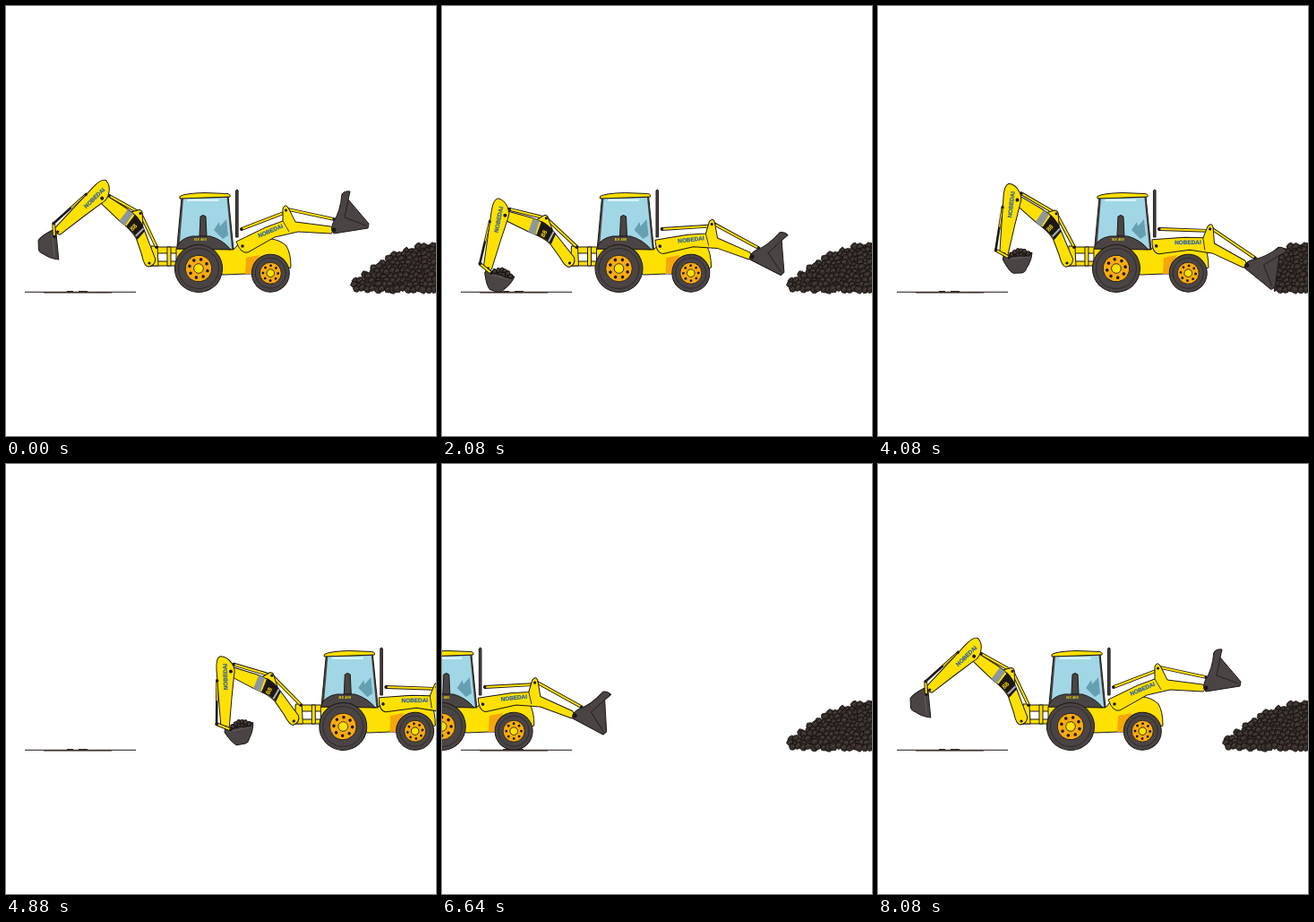
Recreate the animation shown at these times as an HTML page. Size 480 by 480 pixels, loop 8.16 s.

```html
<!DOCTYPE html>
<html lang="en">
<head>
<meta charset="utf-8">
<title>Backhoe loader</title>
<style>
html, body { margin: 0; width: 100%; height: 100%; overflow: hidden; background: #fff; }
svg { display: block; width: 100%; height: 100%; }
.y { fill: #fee102; }
.d { fill: #4a4544; }
.y, .d { stroke: #1d1714; stroke-width: 1; stroke-linejoin: round; }
.k { fill: #1d1714; }
.rim { fill: #f9ab10; stroke: #1d1714; stroke-width: .8; }
.brand { font: bold 6.4px Arial, "Liberation Sans", sans-serif; fill: #2d62a0; stroke: #2d62a0; stroke-width: .25; text-anchor: middle; }
.tag { font: bold 4px Arial, "Liberation Sans", sans-serif; fill: #fee102; text-anchor: middle; }
.rock { fill: #352d2a; stroke: #120d0b; stroke-width: .8; }
.glint { fill: none; stroke: #6a5e58; stroke-width: .7; }
.edge { stroke: #1d1714; stroke-width: 3.8; stroke-linecap: round; }
.rod { stroke: #fee102; stroke-width: 2; stroke-linecap: round; }
</style>
</head>
<body>
<svg viewBox="0 0 480 480">
  <defs>
    <clipPath id="pileClip"><rect id="pileLeft" y="240" height="90"/><rect id="pileRight" y="240" width="600" height="90"/></clipPath>
    <clipPath id="groundClip"><rect width="480" height="320.7"/></clipPath>
  </defs>

  <path d="M21 319.3H145" stroke="#1d1714"/>
  <path d="M42 320H118" stroke="#2c1712"/>
  <path d="M68 318.600H75M81 318.600H91" stroke="#1d1714"/>

  <g id="pile" clip-path="url(#pileClip)"></g>

  <g clip-path="url(#groundClip)"><g id="machine">
    <path class="y" d="M163 269H192V276H163ZM160 285H192V290H160Z"/>
    <path class="y" d="M162 268h7l1 22h-9zM180 269h4v21h-4z"/>

    <g id="boomRam"></g>
    <g id="stickRam"></g>
    <g id="digger">
      <path class="d" d="M-1 2L31 0Q30 9 24 17Q22 22 18 22H9Q4 19 -2 6Z"/>
      <path d="M3 6L28 4.5" stroke="#6b6462" stroke-width=".8"/>
      <g id="load"></g>
    </g>
    <g id="boom">
      <path class="y" d="M-18 -58L-8 -60Q-4 -59 -5 -54L-5 -42Z"/>
      <path class="y" d="M-54 -75Q-51 -83 -44 -78L-23 -63Q-8 -52 -4 -38L7 -4Q6 4 -2 4Q-6 3 -8 -10L-13 -28Q-18 -38 -30 -48L-50 -69Z"/>
      <path fill="#8d979b" d="M-31 -49L-21 -61L-15 -56L-25 -43Z"/>
      <path class="k" d="M-24 -42L-13 -55Q-7 -49 -3 -36L-12 -27Q-16 -36 -24 -42Z"/>
      <path d="M-13.500 -31L-4.500 -39" stroke="#a9b1b4" stroke-width="2"/>
      <text class="tag" style="font-size:7px" transform="translate(-14 -39) rotate(-42)">88</text>
      <circle class="k" cx="-7" cy="-56" r="1.6"/><circle class="k" r="1.6"/>
    </g>
    <g id="stick">
      <path d="M-17 6L-28 53" class="edge" style="stroke-width:2.6"/>
      <path d="M-17 6L-22 28" class="rod" style="stroke-width:1.2"/>
      <path class="y" d="M-15 -6Q-13 -18 -8 -19Q-1 -18 3 -9Q6 -2 3 4L-5 28L-15 60Q-20 63 -24 57Z"/>
      <text class="brand" transform="translate(-5 5) rotate(-79)">NOBEDAI</text>
      <circle class="k" r="2"/><circle class="k" cx="-17" cy="7" r="1.6"/><circle class="k" cx="-19" cy="59" r="1.6"/>
    </g>
    <g id="diggerLink"></g>

    <path class="d" d="M256.500 206q1.300 -2 2.600 0V258h-2.600z"/>
    <path class="y" d="M190 271L255 271L262 262Q300 254 313 268Q318 276 318 292L300 299H268L243 300L190 290Z"/>
    <path fill="#f6a60a" d="M268 281L283 278L274 299H267Z"/>
    <path class="d" d="M196 214L248 212L254 272L191 268Z"/>
    <path fill="#a1d7e5" d="M198 215L246.500 214L252 271H245Q234 257 207 258L194 263Z"/>
    <path fill="#65a0b2" d="M232 250L238 241L239 246L246 238L248 256L242 260Z"/>
    <path fill="#d8f3f9" d="M203 215.500H238L237 218H202Z"/>
    <path class="y" d="M194 212.500Q200 209 222 208.500L247 209.500Q251 210 250 213L194 215Z"/>
    <path class="d" d="M217 235q3 -3 6 0l1 22h-8z"/>
    <path class="d" d="M190 271Q194 259 208 257H228Q242 261 251 272Z"/>
    <text class="tag" x="217" y="261.500">BX 400</text>
    <g id="rear"></g>
    <g id="front"></g>

    <g id="liftRam"></g>
    <g id="tiltRam"></g>
    <g id="loader">
      <path class="y" d="M257 263L290 247L309 240V226Q312 219 316 227L323 241L362 246Q368 250 363 254L326 252L300 258L270 275Q262 277 257 263Z"/>
      <path d="M309 240L316 252" stroke="#1d1714" stroke-width=".8"/>
      <text class="brand" transform="translate(296 253) rotate(-23)">NOBEDAI</text>
      <circle class="k" cx="312.500" cy="228" r="1.600"/><circle class="k" cx="264" cy="268" r="1.800"/>
    </g>
    <g id="scoop">
      <path class="d" d="M9 -40Q12 -44 18 -43L16 -34L39 -7L38 -2L0 4Q-5 0 0 -10Q7 -20 9 -40Z"/>
      <path d="M16 -34L12 -14L36 -5" fill="none" stroke="#1d1714" stroke-width=".8"/>
      <circle class="k" r="2.500"/>
    </g>
  </g></g>
</svg>
<script>
const LOOP = 8160, STEP = 80, HOME = 215;
const DIG = 1280, PUSH = 2700, REENTER = 6080, UNFOLDED = 7700;
const BOOM_BASE = [160, 287], LIFT_PIVOT = [262, 257];
const $ = id => document.getElementById(id);

let seed = 7;
const rand = () => (seed = (seed * 16807) % 2147483647) / 2147483647;

function rock(x, y, r) {
  const pts = [], turn = rand() * 6;
  for (let i = 0; i < 7; i++) {
    const a = turn + i * Math.PI * 2 / 7, q = r * (.8 + rand() * .35);
    pts.push((x + q * Math.cos(a)).toFixed(1) + ' ' + (y + q * Math.sin(a)).toFixed(1));
  }
  const g = r * .45;
  return `<path class="rock" d="M${pts.join('L')}Z"/>` +
    `<path class="glint" d="M${x - g} ${y + g * .3}l${g} ${-g}l${g * .8} ${g * .6}"/>`;
}

function buildPile() {
  const top = x => Math.max(264, x < 430 ? 308 - (x - 384) * .69 : 276 - (x - 430) * .38);
  let out = '';
  for (let row = 0, y = 264; y < 320; y += 4.7, row++)
    for (let x = 388 + row % 2 * 3; x < 486; x += 5.8) {
      const px = x + rand() * 3 - 1.5, py = y + rand() * 3 - 1.5;
      if (py > top(px) + 2.5) out += rock(px, py, 3.9 + rand() * .8);
    }
  return out;
}

function buildLoad() {
  let out = '';
  for (let i = 0; i < 12; i++) {
    const u = i % 6, heap = i > 5 ? Math.sin(u / 5 * Math.PI) * 4 : 0;
    out += rock(8 + u * 3.7, 1 - heap, 2.7);
  }
  return out;
}

function wheel(r, hub) {
  let out = `<circle class="d" r="${r}"/><circle r="${r - 4}" fill="none" stroke="#2a2524" stroke-width=".8"/>` +
    `<circle class="rim" r="${hub}"/>`;
  for (let i = 0; i < 8; i++) {
    const a = i * Math.PI / 4;
    out += `<circle class="k" r="${hub * .12}" cx="${hub * .7 * Math.cos(a)}" cy="${hub * .7 * Math.sin(a)}"/>`;
  }
  return out + `<circle class="rim" style="fill:#fee102" r="${hub * .36}"/>`;
}

// Eased 0 to 1 between two times; span rises and later falls again.
function ramp(t, from, to) {
  const u = Math.min(1, Math.max(0, (t - from) / (to - from)));
  return u * u * (3 - 2 * u);
}
const span = (t, a, b, c, d) => ramp(t, a, b) - ramp(t, c, d);

// Back up, speed off to the right, then roll in from the left and brake.
function driveX(t) {
  if (t >= REENTER) return HOME - 415 * Math.max(0, 1 - (t - REENTER) / 2000) ** 2;
  return HOME - 17.5 * ramp(t, -400, 1700) + 17.5 * ramp(0, -400, 1700) * (1 - ramp(t, 0, DIG)) +
    34.8 * Math.max(0, (t - PUSH) / 1000) ** 2.1;
}

function pose(t) {
  const dig = span(t, 0, DIG, 1500, 3100);
  const carry = span(t, 1700, 3200, 3300, 5680);
  const drop = span(t, 3300, 5680, REENTER, UNFOLDED);
  const reach = 1 - span(t, 0, DIG, REENTER, UNFOLDED);
  const curl = 1 - span(t, DIG, 2400, REENTER, UNFOLDED);
  const low = span(t, 800, PUSH, REENTER, 7900);
  return {
    boom: -3 - 26 * dig + 5 * carry - 23 * drop,
    stick: 35 * reach - 17 * drop,
    digger: 88 * curl - 12 * drop,
    lift: 22 * low,
    scoop: 48 * low
  };
}

function around([ox, oy], x, y, deg) {
  const a = deg * Math.PI / 180, c = Math.cos(a), s = Math.sin(a);
  return [ox + x * c - y * s, oy + x * s + y * c];
}
const place = (id, [x, y], deg) => $(id).setAttribute('transform', `translate(${x} ${y}) rotate(${deg})`);
function ram(id, a, b) {
  const d = `M${a}L${b}`, pin = ([x, y]) => `<circle class="k" cx="${x}" cy="${y}" r="1.6"/>`;
  $(id).innerHTML = `<path class="edge" d="${d}"/><path class="rod" d="${d}"/>` + pin(a) + pin(b);
}

function draw(t) {
  const x = driveX(t), shift = x - HOME, p = pose(t);
  const roll = r => x / r * 180 / Math.PI;
  $('machine').setAttribute('transform', `translate(${shift} 0)`);
  place('rear', [215, 293], roll(26.5));
  place('front', [295.3, 298.2], roll(21));

  const joint = around(BOOM_BASE, -49, -75, p.boom);
  const ear = around(BOOM_BASE, -7, -56, p.boom);
  const wrist = around(joint, -19, 59, p.stick);
  place('boom', BOOM_BASE, p.boom);
  place('stick', joint, p.stick);
  place('digger', wrist, p.digger);
  ram('boomRam', ear, [168, 269]);
  ram('stickRam', around(joint, 5, -7, p.stick), ear);
  ram('diggerLink', around(joint, -28, 54, p.stick), around(wrist, 5, 4, p.digger));
  const full = t < REENTER ? ramp(t, 1400, 1900) : 0;
  $('load').setAttribute('transform', `scale(1 ${full})`);
  $('load').style.display = full ? '' : 'none';

  const onArm = (px, py) => around(LIFT_PIVOT, px - LIFT_PIVOT[0], py - LIFT_PIVOT[1], p.lift);
  const hinge = onArm(366, 250);
  $('loader').setAttribute('transform', `rotate(${p.lift} ${LIFT_PIVOT})`);
  place('scoop', hinge, p.scoop);
  ram('liftRam', [263, 249], onArm(310, 231));
  ram('tiltRam', onArm(315, 227), around(hinge, 0, -12, p.scoop));

  // The scoop clears the heap; the digger lays it down again behind it.
  const clearing = t > PUSH && t < REENTER;
  $('pileLeft').setAttribute('width', clearing ? Math.max(0, wrist[0] + shift + 4) : 480);
  $('pileRight').setAttribute('x', clearing ? x + 176 : 480);
}

$('pile').innerHTML = buildPile();
$('load').innerHTML = buildLoad();
$('rear').innerHTML = wheel(26.5, 14.8);
$('front').innerHTML = wheel(21, 12);

const start = performance.now();
function tick() {
  const t = (performance.now() - start) % LOOP;
  draw(Math.floor(t / STEP) * STEP);
  requestAnimationFrame(tick);
}
draw(0);
requestAnimationFrame(tick);
</script>
</body>
</html>
```
